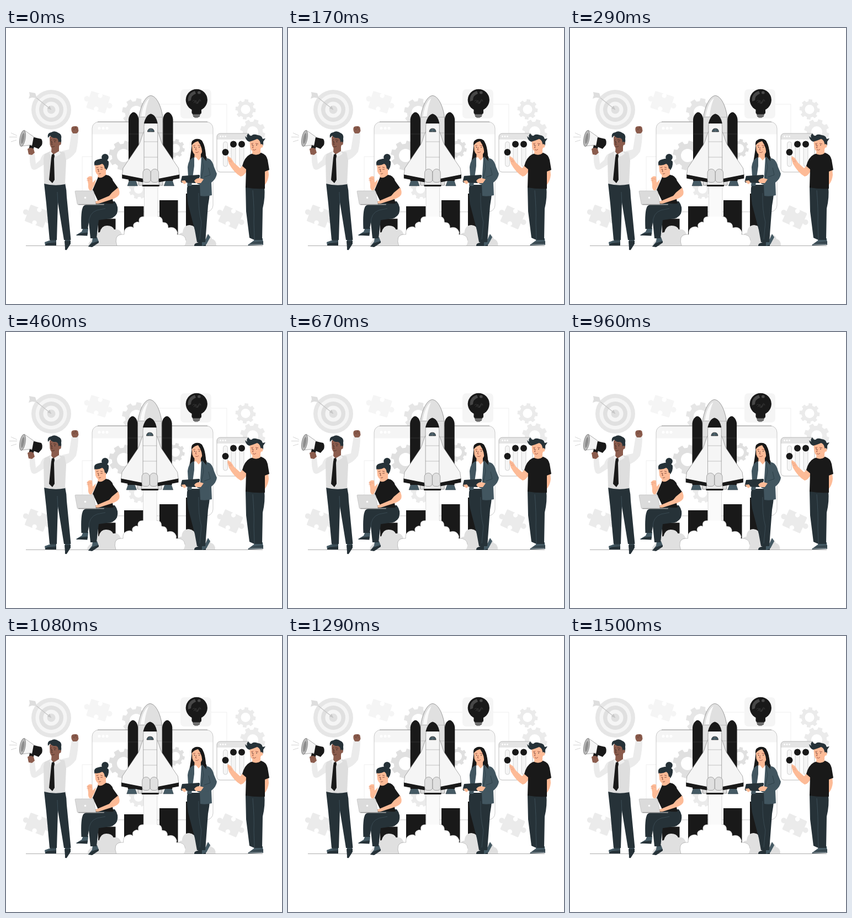
An HTML page with a canvas that plays this animation: 500x500 px, repeating every 1540 ms.

```html
<!DOCTYPE html>
<html lang="en">
<head>
<meta charset="utf-8">
<title>Rocket launch</title>
<style>
html, body { margin: 0; width: 100%; height: 100%; overflow: hidden; background: #fff; }
canvas { display: block; width: 100vw; height: 100vh; }
</style>
</head>
<body>
<canvas id="stage" width="500" height="500"></canvas>
<script>
const ctx = document.getElementById('stage').getContext('2d');
const INK = '#191919', NAVY = '#263238', SLATE = '#455a64', LINE = '#777';
const BROWN = '#8b5c4d', PEACH = '#fdbb97', BLAZER = '#425660';
const LOOP = 1540, STEPS = 37, SHAKE = 1500;

function path(d, fill, stroke, width = 0.6) {
  const p = new Path2D(d);
  if (fill) { ctx.fillStyle = fill; ctx.fill(p, 'evenodd'); }
  if (stroke) { ctx.strokeStyle = stroke; ctx.lineWidth = width; ctx.stroke(p); }
}
function oval(x, y, rx, ry, fill, stroke, turn = 0) {
  ctx.beginPath();
  ctx.ellipse(x, y, rx, ry, turn, 0, 7);
  if (fill) { ctx.fillStyle = fill; ctx.fill(); }
  if (stroke) { ctx.strokeStyle = stroke; ctx.lineWidth = 0.6; ctx.stroke(); }
}
const dot = (x, y, r, fill, stroke) => oval(x, y, r, r, fill, stroke);
function box(x, y, w, h, r, fill, stroke, width = 0.6) {
  ctx.beginPath();
  ctx.roundRect(x, y, w, h, r);
  if (fill) { ctx.fillStyle = fill; ctx.fill(); }
  if (stroke) { ctx.strokeStyle = stroke; ctx.lineWidth = width; ctx.stroke(); }
}
function at(x, y, turn, draw) {
  ctx.save();
  ctx.translate(x, y);
  ctx.rotate(turn);
  draw();
  ctx.restore();
}
// Draws once as is and once reflected in the vertical line at x.
function mirrored(x, draw) {
  draw();
  ctx.save();
  ctx.translate(2 * x, 0);
  ctx.scale(-1, 1);
  draw();
  ctx.restore();
}

function gear(x, y, r, hole, fill, turn = 0) {
  const teeth = 8, step = Math.PI * 2 / teeth;
  ctx.beginPath();
  for (let i = 0; i < teeth; i++) {
    for (const [k, s] of [[-0.32, 0.79], [-0.22, 1], [0.22, 1], [0.32, 0.79]]) {
      const a = turn + (i + k) * step;
      ctx.lineTo(x + Math.cos(a) * r * s, y + Math.sin(a) * r * s);
    }
  }
  ctx.closePath();
  ctx.moveTo(x + hole, y);
  ctx.arc(x, y, hole, 0, 7);
  ctx.fillStyle = fill;
  ctx.fill('evenodd');
}

function puzzle(x, y, turn, fill) {
  at(x, y, turn, () => {
    box(-18, -16, 36, 32, 2, fill);
    for (const s of [-1, 1]) {
      box(s * 19 - 3, -3, 6, 6, 0, fill);
      dot(s * 21.5, 0, 5, fill);
      dot(0, s * 12.5, 4.2, '#fff');
      box(-2.2, s * 15.5 - 2, 4.4, 4, 0, '#fff');
    }
  });
}

function target() {
  [[36, '#e6e6e6'], [28.5, '#f5f5f5'], [22, '#e0e0e0'], [14.5, '#f5f5f5'], [7.5, '#e0e0e0']]
    .forEach(([r, c]) => dot(82, 148, r, c));
  path('M48 121L82 148', null, '#c7c7c7', 1.3);
  path('M42 116l11 2 3 9-9-1-6 2 2-6z', '#dedede');
  path('M82 148l-7-2 4-5z', '#c7c7c7');
}

function backdrop() {
  target();
  puzzle(167, 134.5, 0.3, '#f5f5f5');
  puzzle(56, 341, 0.36, '#ebebeb');
  puzzle(407, 343, 0.42, '#ebebeb');
  gear(236, 153, 26, 12, '#e6e6e6', 0.2);
  gear(434, 147.5, 18.5, 8.5, '#ebebeb', 0.1);
  gear(447, 188, 23, 10, '#ebebeb', 0.3);
  path('M276 138H400V191M156 233H138V320H166', null, '#ebebeb', 0.8);

  box(156, 170, 219, 163, 12, '#fff');
  box(156, 170, 219, 22.5, [12, 12, 0, 0], '#f5f5f5');
  box(156, 170, 219, 163, 12, null, '#bdbdbd', 0.8);
  path('M166 170H365', null, '#888', 0.8);
  [169, 176, 183].forEach(x => dot(x, 181.5, 2.5, '#fff'));
  gear(213, 231, 27, 12, '#e0e0e0', 0.25);
  gear(307, 218, 17, 8, '#e0e0e0', 0.2);
  gear(240, 292, 18, 8, '#ebebeb', 0.3);

  for (const [x, y, w] of [[167, 345.5, 31.5], [214, 323, 35.5], [278, 312, 33.5], [326, 300, 33]])
    box(x, y, w, 394 - y, 0, INK);
  lamp();
  panel();
  path('M36 394.5H465', null, '#888', 0.7);
}

function lamp() {
  box(316, 111, 56, 53, 7, '#f5f5f5');
  path('M338 154H352L351 160 347 163H342L339 160z', '#8b8b8b');
  path('M338 157H352M339 160H351', null, '#333', 1);
  dot(345.3, 130.3, 19.6, INK);
  box(336.5, 146, 17.5, 10, 3, INK);
  path('M330 133Q328 119 342 114L344 119Q335 122 335 131z', '#484848');
  oval(349.8, 117, 2.8, 2.6, '#484848');
  path('M338 133q3-5 5 1t5-1 5 0M340 136l4-5 3 6 4-6', null, '#4c4c4c', 0.6);
}

function panel() {
  box(382, 191, 61, 70, 6, '#fff');
  box(382, 191, 61, 11, [6, 6, 0, 0], '#e4e4e4');
  box(382, 191, 61, 70, 6, null, '#aaa', 0.8);
  [388.5, 393, 397.5].forEach(x => dot(x, 196.5, 1.4, '#fff'));
  for (const [x, y] of [[397.5, 225], [412, 210.5], [427, 210.5]]) {
    box(x - 4, 206, 8, 45, 4, '#f5f5f5', '#bbb');
    dot(x, y, 6, INK);
  }
}

function smoke() {
  path('M149 394Q150 384 160 383Q158 371 170 370Q173 358 183 358Q193 358 196 365Q207 363 210 374V394z', '#e0e0e0');
  path('M314 394V373Q319 370 320 371Q321 357 333 357Q344 358 346 370Q356 366 361 375Q371 373 373 382Q381 384 381 394z', '#e0e0e0');
  path('M250.5 287V348H275V287z', '#fafafa', '#bbb', 0.5);
  const cloud = 'M201 394Q198 387 200 380Q203 373 214 374Q213 364 220 361Q228 358 231 362Q229 354 235 352Q238 350 241 352Q239 341 250 341.5';
  path(cloud + 'H275Q284 341 284 352Q294 351 294 362Q303 359 308 365Q312 370 310 374Q325 373 326 385Q326 391 323 394z', '#fff');
  path(cloud, null, '#888', 0.5);
  path('M275 341.5Q284 341 284 352Q294 351 294 362Q303 359 308 365Q312 370 310 374Q325 373 326 385', null, '#999', 0.5);
}

function rocket() {
  const mid = 262.3;
  path('M240.500 285V163C243 143 252 123 262.3 122.5C273 123 282 143 284 163V285z', '#e0e0e0', LINE, 0.7);
  path('M245 160C247 144 253 131 260 127C256 136 253 147 252 160z', '#fafafa');
  path('M241 161.500H284M241 190H284', null, '#999', 0.5);
  mirrored(mid, () => {
    path('M224 274H234L238.5 286H220z', SLATE, NAVY, 0.5);
    path('M222 277V166C222.5 158 228 152.5 231 152.5C235 152.5 240 158 240.3 166V277z', INK);
    path('M222.5 192H240M222.5 237H240', null, '#444', 0.5);
    path('M251 186C246 193 245 204 241 211L212 254L210.5 266L251 275z', '#f5f5f5', LINE, 0.6);
    path('M210.2 265.500L251 273.500V280L210.2 272.500z', INK);
  });
  path('M250 280V177C252 168 256 157 262.3 156C268.500 157 272.500 168 274.7 177V280z', '#f5f5f5', LINE, 0.6);
  path('M249.800 173C252 164 256 156.5 262.3 155.5C269 156.5 273 164 274.8 173z', INK);
  path('M256.3 188Q257 182 262.3 182Q268 182 268.500 188z', SLATE, INK, 0.7);
  path('M262.3 182V188M250 234H275M250 206H275', null, '#888', 0.5);
  path('M249 274H276L278 285H247z', '#e8e8e8', LINE);
  mirrored(mid, () => box(248, 255.5, 14.2, 24, [7, 7, 5, 5], '#e0e0e0', '#777'));
  box(247, 284, 31, 3, 1, INK);
}

function manWithMegaphone() {
  path('M9 190l11 5M6 197.5h14M9 206l10-3', null, '#c9c9c9', 0.8);
  path('M70 388l11-4h10v10H71z', SLATE);
  path('M71 394q1-5 9-5l11-1v6z', NAVY);
  path('M106 386l11-1v6l-7 11q-4 1-3-3z', NAVY);
  path('M80 376h11v11H80zM105 376l11-1v11h-9z', '#37474f');
  path('M69 281H107Q110 294 110 306L117.500 384H105L94 316L92 384H79L73 318z', NAVY);
  path('M93 297L94 320', null, SLATE, 0.7);

  path('M70 228Q65 229 62 239L54 246L52 228H43Q42 244 46 254Q50 260 58 254L71 246z', '#ebebeb');
  path('M101 223L114 220L119 189H131Q131 207 127 224Q120 235 107 240z', '#ebebeb');
  path('M70 228L81 223H95L106 225L109 240L107 283Q88 287 69 282L68 236z', '#dedede');
  path('M83 211h13v14l-10 5-4-5z', BROWN);
  path('M81 223l5 6 10-6 3 5-8 5-5-4-4 5-3-7z', '#f0f0f0');
  path('M83 229l4-1 1 4-1 5 1 38-4 6-6-6 4-40z', INK);

  path('M79 198Q81 193 92 194L98 204Q98 218 90 221Q82 221 79.500 211z', BROWN);
  path('M76 199Q74 190 82 189Q88 185 95 190Q102 193 100 201Q101 207 98 211L95 206Q95 200 90 199Q84 200 80 195z', NAVY);
  oval(97.5, 209, 2.3, 3, BROWN);
  path('M80 203.500l3-1M86 202.500l5 1M83.500 206l-1 5h2M83 215q4 1 5-1', null, '#40271f', 0.8);
  dot(82, 206, 0.8, INK);
  dot(88.5, 206, 0.8, INK);

  path('M118.500 181q1-3 5-3 5-1 7 2l1 6q-1 4-4 5h-6q-4-4-3-10z', BROWN);
  path('M121 180l2 5 3-6 2 6', null, '#5b342b', 0.5);

  path('M33 185L50 197L62 203L58 215L46 212L27 214z', '#f5f5f5', LINE);
  path('M50 198L64 201Q67 206 65 212L59 219L47 214z', INK);
  path('M43 212l8 3-4 13-7-3z', INK);
  oval(30, 200, 5, 14.8, '#b9b9b9', '#555', 0.18);
  oval(30.3, 200, 2.6, 10, '#8d8d8d', null, 0.18);
  path('M39 219q6-4 11 0l2 7-5 4-6-1z', BROWN);
}

function womanSitting() {
  path('M127 375l10-6 3-7h9l-1 12-20 2z', SLATE);
  path('M127.5 375.5q6-4 11-4l9-1v6z', NAVY);
  path('M149 396l7-9 1-8h8l3 8-12 9z', SLATE);
  path('M149 396q6-7 9-7l10-3v3l-12 8z', NAVY);
  path('M162 314H197Q205 324 201 336Q196 346 182 346L168 348L164 381L153 381L150 352L148 364H136.500Q135 331 140 323Q146 317 162 319z', NAVY);
  path('M150 354Q150 335 165 330L180 327', null, SLATE, 0.6);

  path('M168 258h13v14l-9 4-6-5z', PEACH);
  path('M161 283L155 294Q148 296 149 283L147 272Q150 267 156 269L157 280L163 274z', PEACH);
  path('M167 270Q172 274 181 266Q191 267 194 277L204 291L193 299Q192 310 195 318Q177 319 167 314L157 293Z', INK);
  path('M203 289Q207 296 205 302Q201 308 190 311L168 318Q160 319 161 315L187 304L192 298z', PEACH);

  dot(179.5, 234.2, 6.3, NAVY);
  path('M161 250Q157 240 167 238Q180 234 186 242Q187 253 180 259L172 255z', NAVY);
  path('M161 248Q168 249 176 245L181 254Q182 267 173 269Q165 268 162 260z', PEACH);
  path('M160 248Q160 240 171 239Q183 240 182 255L179 255Q178 247 174 246Q167 250 160 248z', NAVY);
  path('M163.500 253l4-1M171 252l4 1M165 256h3M171 256h4M168 256l-1 4h2M168 264q3 1 4-1', null, '#5d2b22', 0.7);
  path('M146 273q4-1 9 1M146 276h5', null, '#d68b70', 0.5);

  path('M125 296Q125 295 127 295H157Q159 295 159 297L163 320H131Q129 320 129 318z', '#dbdbdb', '#aaa', 0.5);
  box(131, 319, 47, 1.6, 0.8, '#a0a0a0');
  dot(143.5, 307.5, 1.8, '#fff');
}

function womanWithTablet() {
  path('M341 394q0-4 6-5l5-3h10v9h-21z', NAVY);
  path('M355 388l7-6 4-9 4 6-7 13-8 3z', SLATE);
  path('M331 276H369Q371 296 366 322L361 388H346L342 366L330 320Q327 302 328 290z', NAVY);
  path('M349 299Q348 330 354 352L351 383', null, SLATE, 0.6);
  path('M337 205Q346 197 355 204Q360 215 362 231Q367 241 363 246L332 243Q336 222 337 205z', INK);
  path('M342 223H353V235L349 243L341 237z', PEACH);
  path('M338 236L344 234L349 240L354 234L358 243L352 284H335z', '#fff');
  path('M341 234Q331 236 329 252L330 269L328 286L336 286L341 250z', BLAZER);
  path('M354 233L368 237Q374 240 377 252L382 264Q381 273 372 280L373 303Q361 306 352 304L351 283z', BLAZER);
  path('M355 234L358 252L352 282M367 253L370 266L359 270', null, '#263840', 0.7);
  path('M336.500 207Q344 200 353 205L357 219Q355 230 347 232Q340 230 337.500 222z', PEACH);
  path('M336 213Q335 204 342 202Q351 199 356 206Q361 214 362 231L363 241L355 232Q357 217 348 205Q341 206 336 213z', INK);
  path('M339 213.500l4-1M347.500 212.500l5 1M344.500 216l-1 5h2M343 225q4 2 6-1', null, '#7a3028', 0.7);
  dot(341.5, 216, 0.8, INK);
  dot(350, 216, 0.8, INK);
  path('M366 271L371 280L352 284Q346 283 344 279L353 273z', BLAZER);
  path('M319 268L349 266Q352 266 351 269L347 279Q346 281 344 281L318 280Q316 279 317 276z', NAVY);
  path('M341 277q3-5 10-5l7 2-5 7h-9zM317 277l7-1 3 4-4 3z', PEACH);
}

function manPointing() {
  path('M438 393l11-8 2-4h14l1 12z', SLATE);
  path('M438 394q5-6 12-6l16-2v7z', '#37474f');
  path('M440 392h25', null, '#aab4b9', 0.8);
  path('M434 287H468Q470 307 465 327L464 384H450L441 380L435 332z', NAVY);
  path('M447 294Q450 330 449 352L450 383', null, SLATE, 0.7);
  path('M468 255H475L476 266Q475 277 469 284L465 290L462 279L468 270z', PEACH);
  path('M434 244L424 254L413 244L408 236L402 232L401 236L404 246Q413 262 425 269Q431 269 437 257z', PEACH);
  path('M402 236l7 5M404 241l5 2', null, '#d68b70', 0.5);
  path('M442 229L451 226H462Q472 229 474 239L477 257L469 260L469 291Q451 292 434 289L435 256L428 250Q432 234 442 229z', INK);
  path('M447 217H461V227Q454 232 446 228z', PEACH);
  path('M441 202Q450 195 460 199L464 209Q463 223 453 226Q445 225 442.500 217z', PEACH);
  path('M441 206Q435 205 433 196L437 199Q435 194 439 191Q441 196 445 195Q448 191 456 194Q464 195 465 201L470 200L466 206Q467 213 463 216L461 209Q460 203 455 201Q448 204 441 206z', NAVY);
  oval(463, 213.5, 2.3, 3.2, PEACH);
  path('M444 210l4-1M452 209l5 1M448.500 212l-2 5h2M447 220.500q4 2 6-1', null, '#7a3028', 0.7);
  dot(446.3, 212, 0.8, INK);
  dot(454, 212, 0.8, INK);
}

function ease(x) {
  const bezier = (s, a, b) => 3 * (1 - s) ** 2 * s * a + 3 * (1 - s) * s * s * b + s ** 3;
  let lo = 0, hi = 1;
  for (let i = 0; i < 24; i++) {
    const s = (lo + hi) / 2;
    if (bezier(s, 0.36, 0.19) < x) lo = s; else hi = s;
  }
  return bezier(lo, 0.07, 0.97);
}

// Sideways positions at every tenth of the shake.
const SWAY = [0, -0.5, 1, -2, 2, -2, 2, -2, 1, -0.5, 0];
function sway(ms) {
  const u = (ms % SHAKE) / SHAKE * 10, i = Math.floor(u);
  return SWAY[i] + (SWAY[i + 1] - SWAY[i]) * ease(u - i);
}

function draw(ms) {
  const step = Math.floor((ms % LOOP + 4) / (LOOP / STEPS)) % STEPS;
  ctx.fillStyle = '#fff';
  ctx.fillRect(0, 0, 500, 500);
  backdrop();
  at(sway(step * 1000 / 24), 0, 0, () => { smoke(); rocket(); });
  manWithMegaphone();
  womanSitting();
  womanWithTablet();
  manPointing();
}

const start = performance.now();
function tick() {
  draw(performance.now() - start);
  requestAnimationFrame(tick);
}
tick();
</script>
</body>
</html>
```
